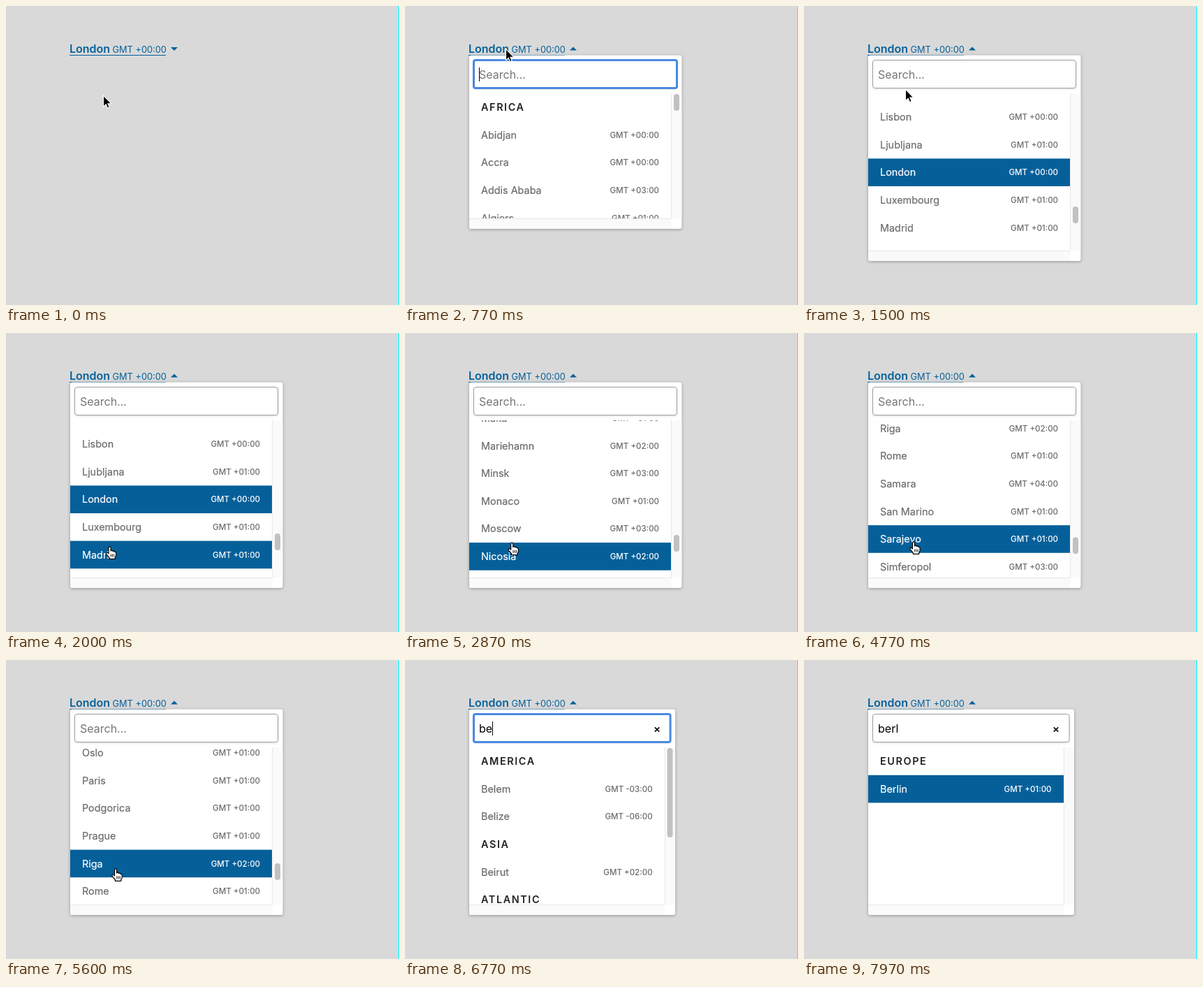
An HTML page that plays this animation: 563x428 px, repeating every 8000 ms.

```html
<!DOCTYPE html>
<html lang="en">
<head>
<meta charset="utf-8">
<title>Time zone picker</title>
<style>
  html, body { margin: 0; width: 100%; height: 100%; overflow: hidden; background: #d9d9d9; }
  svg { display: block; width: 563px; height: 428px; font-family: Inter, sans-serif; }
  .link { fill: #05609a; }
  .head { font-size: 14.4px; font-weight: 600; letter-spacing: 1.6px; fill: #222; }
  .city { font-size: 14.4px; fill: #6b6b6b; stroke: #6b6b6b; stroke-width: .2px; }
  .zone { font-size: 11.52px; font-weight: 500; fill: #6b6b6b; text-anchor: end; }
  .on text { fill: #fff; }
  .on .city { stroke: #fff; }
  #panel { filter: drop-shadow(0 1px 2px rgba(0, 0, 0, .32)); }
  #field { filter: drop-shadow(0 1px 1.5px rgba(0, 0, 0, .15)); }
</style>
</head>
<body>
<svg viewBox="0 0 563 428">
  <defs>
    <clipPath id="panelClip"><rect id="panelBox" x="92" y="70.5" rx="3"/></clipPath>
    <clipPath id="listClip"><rect id="listBox" x="92" y="125"/></clipPath>
  </defs>
  <rect width="563" height="428" fill="#d9d9d9"/>
  <rect x="562" width="1" height="428" fill="#0ff"/>

  <g class="link">
    <text x="91" y="67" font-size="16" font-weight="600">London</text>
    <text x="152.5" y="67" font-size="12.8">GMT +00:00</text>
    <rect x="91" y="70" width="138" height="1"/>
    <path id="caretIcon"/>
  </g>

  <g id="menu">
    <rect id="panel" x="92" y="70.5" rx="3" fill="#fff"/>
    <g clip-path="url(#panelClip)">
      <g id="list" clip-path="url(#listClip)"></g>
      <rect id="vTrack" y="125" width="15" fill="#fafafa"/>
      <rect id="vLine" y="125" width="1" fill="#e8e8e8"/>
      <rect id="hTrack" x="92" height="15" fill="#fafafa"/>
      <rect id="hLine" x="92" height="1" fill="#e8e8e8"/>
      <rect id="thumb" width="8" rx="4" fill="#c1c1c1"/>
      <rect id="field" x="98.5" y="77.5" height="40" rx="3.5" fill="#fff" stroke="#a0a0a0"/>
      <rect id="ring" x="98.5" y="77.5" height="40" rx="2.5" fill="none" stroke="#4b89e2" stroke-width="3"/>
      <text id="query" x="106" y="104" font-size="16"></text>
      <rect id="caret" y="88" width="1" height="20" fill="#000"/>
      <path id="clear" d="M-3.2-3.2L3.2 3.2M3.2-3.2L-3.2 3.2" stroke="#111" stroke-width="1.8"/>
    </g>
  </g>

  <g id="arrow">
    <path d="M0 0V16.2L3.7 12.7 6 18.2 8.7 17 6.4 11.7H11.4Z" fill="#000" stroke="#fff" stroke-width="1.1"/>
  </g>
  <g id="beam" fill="none" stroke="#222" stroke-width="1.1">
    <path d="M-3-8Q0-8 0-6Q0-8 3-8M0-6V6M-3 8Q0 8 0 6Q0 8 3 8M-1.5 2H1.5"/>
  </g>
  <g id="hand" stroke="#000" stroke-linejoin="round" stroke-linecap="round">
    <path d="M-1.5 9V1.2Q-1.2-.2 .1-.2 1.4-.2 1.6 1.2V6Q2.2 4.8 3.5 5.2 4.4 5.5 4.5 6.4 6.6 5.3 7.2 7.4 9 6.8 9.2 8.9V12Q8.9 14 7.9 15V17.3H-.6V15.5L-4.9 10.4Q-5.5 9 -4.4 8.3 -3.2 8 -1.5 9.8Z" fill="#fff" stroke-width="1.2"/>
    <path d="M1.8 10.8V14M4 10.8V14M6.2 10.8V14" fill="none" stroke-width=".9"/>
  </g>
</svg>

<script>
const LOOP = 8000, ROW = 39.6, OPEN = 600, JUMP = 900, TYPE = 6500, PICK = 7970;
const $ = id => document.getElementById(id);
const set = (id, attrs) => { for (const k in attrs) $(id).setAttribute(k, attrs[k]); };
const show = (id, on) => set(id, { visibility: on ? 'inherit' : 'hidden' });
const clamp = x => Math.max(0, Math.min(1, x));
const easeOut = (x, power = 2) => 1 - (1 - clamp(x)) ** power;
const easeInOut = x => x * x * (3 - 2 * x);

// "Name+1" is a city and its offset in hours; a bare name is a heading.
const parse = text => text.split(',').map(entry => {
  const [, name, hours] = entry.match(/^([^+-]+)([+-]\d+)?$/);
  return { name, zone: hours && `GMT ${hours[0]}${hours.slice(1).padStart(2, '0')}:00` };
});

const africa = parse('AFRICA,Abidjan+0,Accra+0,Addis Ababa+3,Algiers+1,Asmara+3,Bamako+0');
const europe = parse('Kirov+3,Lisbon+0,Ljubljana+1,London+0,Luxembourg+1,Madrid+1,Malta+1,' +
  'Mariehamn+2,Minsk+3,Monaco+1,Moscow+3,Nicosia+2,Oslo+1,Paris+1,Podgorica+1,Prague+1,' +
  'Riga+2,Rome+1,Samara+4,San Marino+1,Sarajevo+1,Simferopol+3,Skopje+1,Sofia+2,' +
  'Stockholm+1,Tallinn+2,Tirane+1,Vaduz+1');

const typed = [
  { at: 6500, query: 'b', thumb: 30, rows: parse('AFRICA,Abidjan+0,Addis Ababa+3,Bamako+0,Bangui+1,Banjul+0') },
  { at: 6650, query: 'be', thumb: 128, rows: parse('AMERICA,Belem-3,Belize-6,ASIA,Beirut+2,ATLANTIC,Bermuda-4') },
  { at: 7000, query: 'ber', thumb: 0, rows: parse('ATLANTIC,Bermuda-4,EUROPE,Berlin+1') },
  { at: 7100, query: 'berl', thumb: 0, rows: parse('EUROPE,Berlin+1') }
];

// Each flick: start, end, distance.
const flicks = [[2100, 2670, 228], [2860, 3200, 112], [3400, 3800, 316.5], [4700, 5000, -96], [5330, 5600, -98.9]];
const scrollAt = t => flicks.reduce((sum, [a, b, d]) => sum + d * easeOut((t - a) / (b - a)), 0);

const path = [[0, 139.5, 128], [30, 139.5, 128], [330, 147, 32], [530, 144.5, 61.5], [1270, 144.5, 61.5],
  [2000, 148.5, 306], [2070, 149, 306], [2100, 149, 306], [2670, 153, 300.5], [3400, 154, 300],
  [3600, 156, 299.5], [5000, 157, 299], [LOOP, 157, 299]];

function cursorAt(t) {
  const i = path.findIndex(p => p[0] > t);
  const [a, ax, ay] = path[i - 1], [b, bx, by] = path[i];
  const k = easeInOut((t - a) / (b - a));
  return [ax + (bx - ax) * k, ay + (by - ay) * k];
}

let markup = '';
function drawList(rows, first, right, isOn) {
  const html = rows.map((row, i) => {
    const y = first + i * ROW;
    if (y < 100 || y > 375) return '';
    if (!row.zone) return `<text class="head" x="109" y="${y + 5.2}">${row.name}</text>`;
    const on = isOn(row, y);
    return `<g${on ? ' class="on"' : ''}>` +
      (on ? `<rect x="92" y="${y - ROW / 2}" width="${right - 107}" height="${ROW}" fill="#05609a"/>` : '') +
      `<text class="city" x="109" y="${y + 5.2}">${row.name}</text>` +
      `<text class="zone" x="${right - 32.5}" y="${y + 4.2}">${row.zone}</text></g>`;
  }).join('');
  if (html !== markup) $('list').innerHTML = markup = html;
}

function drawPanel(t, mouseY) {
  const right = 396.5 - 9.5 * easeOut((t - TYPE) / 300);
  const height = 294.5 * easeOut((t - OPEN) / 300, 2.2);
  const bottom = 70.5 + height, listEnd = Math.max(125, bottom - 15);
  const entry = typed.filter(e => e.at <= t).pop();
  const focused = t < JUMP || (t >= TYPE && t < PICK);

  const box = { width: right - 92, height };
  set('panel', box);
  set('panelBox', box);
  set('listBox', { width: right - 107, height: listEnd - 125 });
  set('vTrack', { x: right - 15, height: listEnd - 125 });
  set('vLine', { x: Math.round(right - 15.5), height: listEnd - 125 });
  set('hTrack', { y: bottom - 15, width: right - 107 });
  set('hLine', { y: Math.round(bottom - 15), width: right - 107 });
  set('field', { width: right - 105.5 });
  set('ring', { width: right - 105.5 });
  show('ring', focused);
  show('clear', !!entry);
  set('clear', { transform: `translate(${right - 26} 99.5)` });

  const query = $('query');
  const label = entry ? entry.query : 'Search...';
  if (query.textContent !== label) query.textContent = label;
  set('query', { fill: entry ? '#000' : '#757575' });
  set('caret', { x: entry ? Math.round(106 + query.getComputedTextLength()) : 106 });
  show('caret', focused && t < 7670);

  let thumbY = 126, thumbSize = 24;
  if (entry) {
    thumbSize = entry.thumb;
    drawList(entry.rows, 145, right, row => t >= PICK && row.name === 'Berlin');
  } else if (t < JUMP) {
    drawList(africa, 145, right, () => false);
  } else {
    const scroll = scrollAt(t);
    thumbY = 287 + scroll * .0085;
    drawList(europe, 119.4 - scroll, right, (row, y) =>
      row.name === 'London' || (mouseY > 125 && Math.abs(mouseY - y) <= ROW / 2));
  }
  set('thumb', { x: right - 11.5, y: thumbY, height: thumbSize });
}

function draw(t) {
  const open = t >= OPEN;
  const [x, y] = cursorAt(t);
  set('caretIcon', { d: open ? 'M236 63.5L241 58.5 246 63.5Z' : 'M236 59L241 64 246 59Z' });
  show('menu', open);
  if (open) drawPanel(t, y);

  let kind = 'arrow';
  if (open && y > 77 && y < 118) kind = 'beam';
  if (open && y > 125) kind = 'hand';
  for (const id of ['arrow', 'beam', 'hand']) {
    show(id, id === kind && t < TYPE);
    set(id, { transform: `translate(${x} ${y})` });
  }
}

const start = performance.now();
function tick() {
  draw((performance.now() - start) % LOOP);
  requestAnimationFrame(tick);
}
tick();
</script>
</body>
</html>
```
